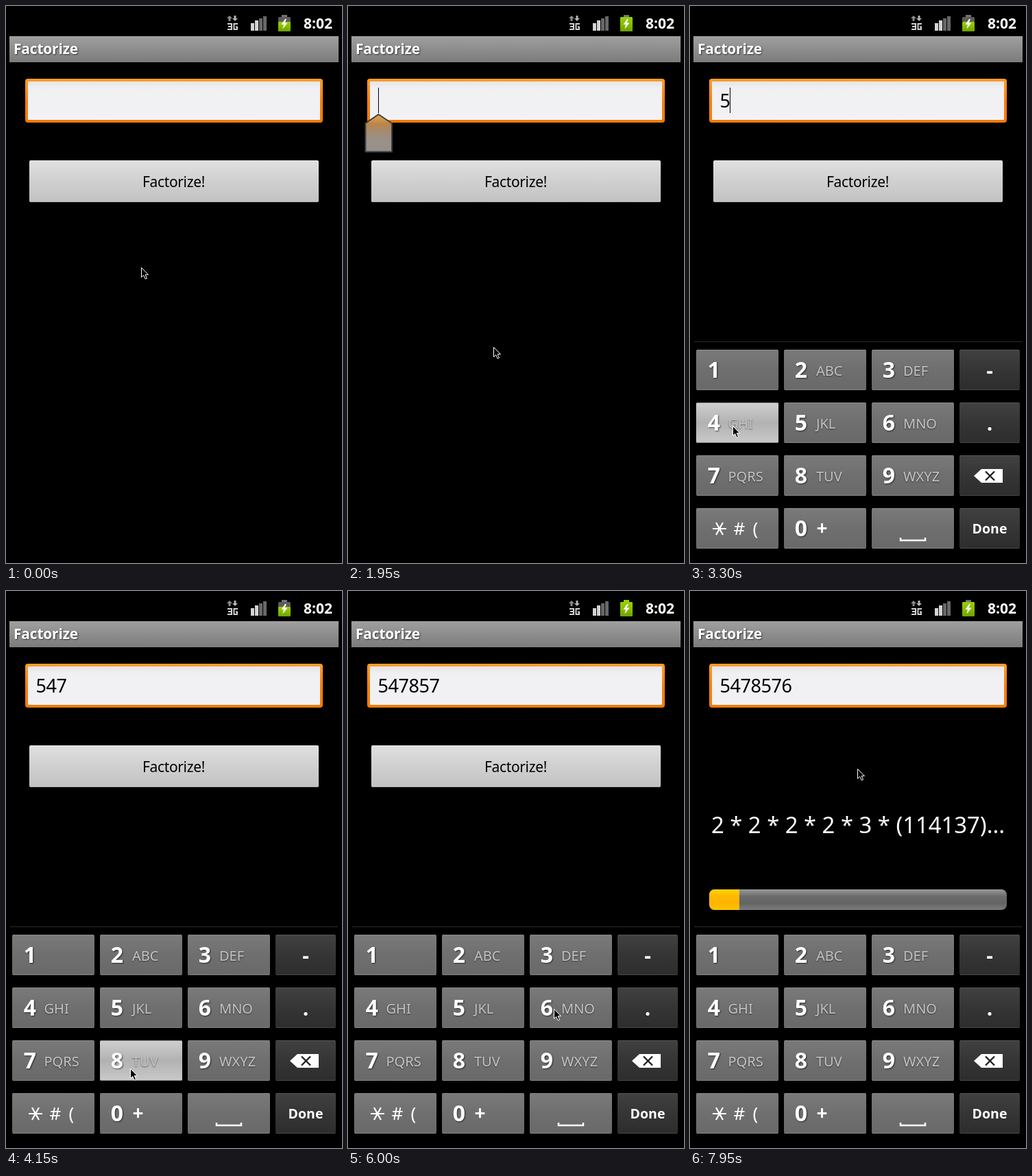
Animation, 490 px wide and 812 px high, one loop 8 s. Source, as an HTML page:

```html
<!DOCTYPE html>
<html lang="en">
<head>
<meta charset="utf-8">
<title>Factorize</title>
<style>
  html, body { margin: 0; width: 100%; height: 100%; overflow: hidden; background: #000; }
  svg { display: block; width: 490px; height: 812px; }
  text { font-family: "Noto Sans", "Open Sans", sans-serif; fill: #fff; white-space: pre; }
  .bold { font-weight: 700; }
  .mid { text-anchor: middle; }
  .dark { fill: #000; }
  .shade { text-shadow: 1px 1px 2px rgba(0, 0, 0, .6); }
  .letters { fill: #c4c4c4; font-size: 20px; text-shadow: 0 1px 2px rgba(0, 0, 0, .5); }
</style>
</head>
<body>
<svg id="stage" viewBox="0 0 490 812" xmlns="http://www.w3.org/2000/svg"></svg>
<script>
const LOOP = 8000;
const stage = document.getElementById('stage');

// Vertical gradients, colours spread evenly from top to bottom.
const gradients = {
  title: ['#a0a0a0', '#8d8d8d', '#7c7c7c'],
  border: ['#ff9d2c', '#f97f0b', '#f27a06'],
  borderDown: ['#ffc642', '#ffae18', '#ff9c00'],
  paper: ['#e4e4e7', '#f0f0f3', '#f1f0f3', '#f1f0f3', '#f1f0f3', '#f1f0f3', '#f3f2f5'],
  button: ['#e0e0e0', '#d0d0d0', '#c2c2c2'],
  buttonDown: ['#ffc23a', '#ff9d10', '#f58200'],
  key: ['#7a7a7a', '#6f6f6f', '#696969'],
  keyDown: ['#cfcfcf', '#b2b2b2', '#c9c9c9'],
  darkKey: ['#414141', '#353535', '#2d2d2d'],
  handle: ['#e0a04c', '#c08a4c', '#a5907c', '#9f968e', '#9c948e'],
  track: ['#9a9a9a', '#6c6c6c', '#646464', '#7c7c7c'],
  fill: ['#ffd30a', '#ffb800', '#ffb400', '#ffc400'],
  green: ['#98d008', '#86bc00', '#6fa200'],
};

const rect = (x, y, w, h, fill, more = '') =>
  `<rect x="${x}" y="${y}" width="${w}" height="${h}" fill="${fill}" ${more}/>`;
const text = (x, y, size, str, cls = '', more = '') =>
  `<text x="${x}" y="${y}" font-size="${size}" class="${cls}" ${more}>${str}</text>`;
const line = (d, width, color = '#fff') =>
  `<path d="${d}" fill="none" stroke="${color}" stroke-width="${width}"/>`;

const defs = Object.entries(gradients).map(([id, colors]) =>
  `<linearGradient id="${id}" x2="0" y2="1">` +
  colors.map((c, i) => `<stop offset="${i / (colors.length - 1)}" stop-color="${c}"/>`).join('') +
  '</linearGradient>').join('');

function statusBar() {
  const bars = [[357, 25], [363, 21], [369, 18], [375, 15]].map(([x, y], i) =>
    rect(x, y, 5, 36 - y, i < 2 ? '#d4d4d4' : '#686868')).join('');
  const network =
    '<path d="M326 14l4 4h-2.5v4h-3v-4H322z" fill="#8c8c8c"/>' +
    '<path d="M334 22l4-4h-2.5v-4h-3v4H330z" fill="#b4b4b4"/>' +
    line('M323 26H329V34H323M324 30H329M338 26H332.5V34H337V30.5H335', 2, '#d0d0d0');
  const battery =
    rect(402, 13, 8, 4, '#747474', 'id="cap"') +
    rect(397, 16, 18, 21, '#5c5c5c', 'rx="1.5"') +
    rect(397, 16, 18, 21, 'url(#green)', 'id="charge" rx="1.5"') +
    '<path d="M407 19l-5.5 8h3.5l-1.5 6.500 7-9h-4l2.500-5.500z" fill="#fff"/>';
  return network + bars + battery + text(434, 33, 21, '8:02', 'bold');
}

const columns = [9, 137, 265, 393];
const rows = [501, 578, 655, 732];

function keyShape(col, row, id) {
  const x = columns[col], y = rows[row], w = col === 3 ? 88 : 120;
  const kind = col === 3 ? 'darkKey' : 'key';
  return rect(x, y, w, 59, `url(#${kind})`, `rx="2" id="${id}"`) +
    rect(x + 1, y, w - 2, 1, col === 3 ? '#555' : '#8a8a8a') +
    rect(x + 1, y + 58, w - 2, 1, col === 3 ? '#484848' : '#858585');
}

function keyboard() {
  const letters = ['', 'ABC', 'DEF', 'GHI', 'JKL', 'MNO', 'PQRS', 'TUV', 'WXYZ'];
  const letterX = [55.5, 184, 311];
  let out = rect(0, 488, 490, 324, '#000') + rect(6, 489, 478, 1, '#2c2c2c');
  for (let row = 0; row < 4; row++)
    for (let col = 0; col < 4; col++)
      out += keyShape(col, row, row < 3 && col < 3 ? 'key' + (row * 3 + col + 1) : `aux${row}${col}`);
  letters.forEach((str, i) => {
    const col = i % 3, y = rows[Math.floor(i / 3)];
    out += text([35, 162, 290][col], y + 41, 32, i + 1, 'bold mid shade') +
      text(letterX[col], y + 38, 20, str, 'letters');
  });
  out += line('M33 762H53M38 753L48 771M48 753L38 771', 2.2) +
    text(63.5, 771, 26, '#') + text(91.500, 771, 26, '(') +
    text(162, 773, 32, '0', 'bold mid shade') + text(184.5, 771, 28, '+', 'bold') +
    line('M307 775V779H343V775', 2.5) +
    text(437, 542, 30, '-', 'bold mid') + text(437, 619, 30, '.', 'bold mid') +
    '<path d="M414 685L425 675H456V695H425Z" fill="#fff"/>' +
    line('M431 678.500L444 691.500M444 678.500L431 691.500', 2.4, '#222') +
    text(437, 769, 19.5, 'Done', 'bold mid');
  return `<g id="keyboard">${out}</g>`;
}

stage.innerHTML = `<defs>${defs}
  <clipPath id="pill"><rect x="28" y="435" width="434" height="30" rx="8"/></clipPath></defs>` +
  rect(0, 0, 490, 812, '#000') +
  statusBar() +
  rect(5, 44, 480, 38, 'url(#title)') +
  text(11, 70, 21, 'Factorize', 'bold shade', 'letter-spacing="-.2"') +
  rect(28, 106, 434, 64, 'url(#border)', 'id="field" rx="4"') +
  rect(32, 110, 426, 56, 'url(#paper)', 'rx="1"') +
  text(43.5, 148, 27, '', 'dark', 'id="entry" letter-spacing="-.44"') +
  rect(44, 119, 1, 37, '#000', 'id="caret"') +
  '<path id="handle" d="M44.5 158L64 171V212.500H25.500V171Z" fill="url(#handle)" fill-opacity=".97" stroke="#3e4043" stroke-width="2"/>' +
  '<g id="button">' +
    rect(34, 225, 422, 61, 'url(#button)', 'id="face" rx="2"') +
    rect(35, 285, 420, 1, '#aeaeae') +
    text(244.5, 264, 21, 'Factorize!', 'dark mid', 'letter-spacing="-.35"') +
  '</g>' +
  '<g id="result">' +
    text(245, 353, 32.8, '', 'mid', 'id="factors"') +
    '<g clip-path="url(#pill)">' +
      rect(28, 435, 434, 30, 'url(#track)') +
      rect(28, 435, 0, 30, 'url(#fill)', 'id="progress"') +
    '</g></g>' +
  keyboard() +
  '<path id="pointer" d="M.5 .5V14.500L3.700 11.500L6.200 17L8.500 16L6.200 10.700H10.500Z" fill="#000" stroke="#fff"/>';

const el = {};
stage.querySelectorAll('[id]').forEach(n => el[n.id] = n);

// Pointer stops: time, x, y.
const path = [
  [0, 197, 381], [650, 197, 381], [1250, 214, 136], [1550, 214, 136],
  [1950, 212, 497], [2500, 202, 613], [2920, 202, 613], [3200, 62, 612],
  [3350, 62, 612], [3500, 66, 686], [3650, 66, 686], [4050, 181, 696],
  [4250, 181, 696], [4500, 186, 618], [4680, 186, 618], [5150, 98, 676],
  [5420, 98, 676], [5800, 190, 618], [6050, 312, 608], [6300, 312, 608],
  [7000, 244, 259], [LOOP, 244, 259],
];
// Key presses: digit, down, up.
const presses = [
  [5, 2750, 2900], [4, 3250, 3350], [7, 3500, 3600], [8, 4100, 4250],
  [5, 4550, 4650], [7, 5250, 5400], [6, 6100, 6250],
];

const between = (t, a, b) => t >= a && t < b;
const clamp = v => Math.min(1, Math.max(0, v));
const smooth = v => v * v * (3 - 2 * v);
const show = (node, on) => node.setAttribute('visibility', on ? 'visible' : 'hidden');
const paint = (node, id) => node.setAttribute('fill', `url(#${id})`);

function pointerAt(t) {
  const i = Math.max(1, path.findIndex(p => p[0] > t));
  const [a, b] = [path[i - 1], path[i]];
  const k = smooth((t - a[0]) / (b[0] - a[0]));
  return [1, 2].map(n => Math.round(a[n] + (b[n] - a[n]) * k));
}

function drawBattery(t) {
  const level = Math.floor(t / 1040) % 3;
  const top = level ? 16 : 23;
  el.charge.setAttribute('y', top);
  el.charge.setAttribute('height', 37 - top);
  el.cap.setAttribute('fill', level === 2 ? '#98d008' : '#747474');
}

function drawEntry(t) {
  const typed = presses.filter(p => t >= p[2]);
  el.entry.textContent = typed.map(p => p[0]).join('');
  const since = typed.length ? typed[typed.length - 1][2] : t >= 1550 ? 1550 : 250;
  show(el.caret, t >= since && (t - since) % 1000 < 500);
  el.caret.setAttribute('x', 44 + 15 * typed.length - (typed.length ? 1 : 0));
  show(el.handle, between(t, 1550, presses[0][2]));
  paint(el.field, between(t, 1400, 1550) ? 'borderDown' : 'border');
}

function drawKeys(t) {
  const k = clamp((t - 2050) / 300);
  const ease = 1 - (1 - k) ** 2;
  show(el.keyboard, k > 0);
  el.keyboard.setAttribute('opacity', ease);
  el.keyboard.setAttribute('transform', `translate(0 ${Math.round(80 * (1 - ease))})`);
  for (let d = 1; d <= 9; d++) {
    const down = presses.some(p => p[0] === d && between(t, p[1], p[2]));
    paint(el['key' + d], down ? 'keyDown' : 'key');
  }
}

function drawResult(t) {
  const done = t >= 7400;
  show(el.button, !done);
  show(el.result, done);
  paint(el.face, between(t, 7250, 7400) ? 'buttonDown' : 'button');
  el.factors.textContent = t < 7500 ? '(5478576)...' : '2 * 2 * 2 * 2 * 3 * (114137)...';
  el.progress.setAttribute('width', Math.round(44 * clamp((t - 7600) / 350)));
}

function frame() {
  const t = performance.now() % LOOP;
  drawBattery(t);
  drawEntry(t);
  drawKeys(t);
  drawResult(t);
  el.pointer.setAttribute('transform', `translate(${pointerAt(t).join(' ')})`);
  requestAnimationFrame(frame);
}
frame();
</script>
</body>
</html>
```
